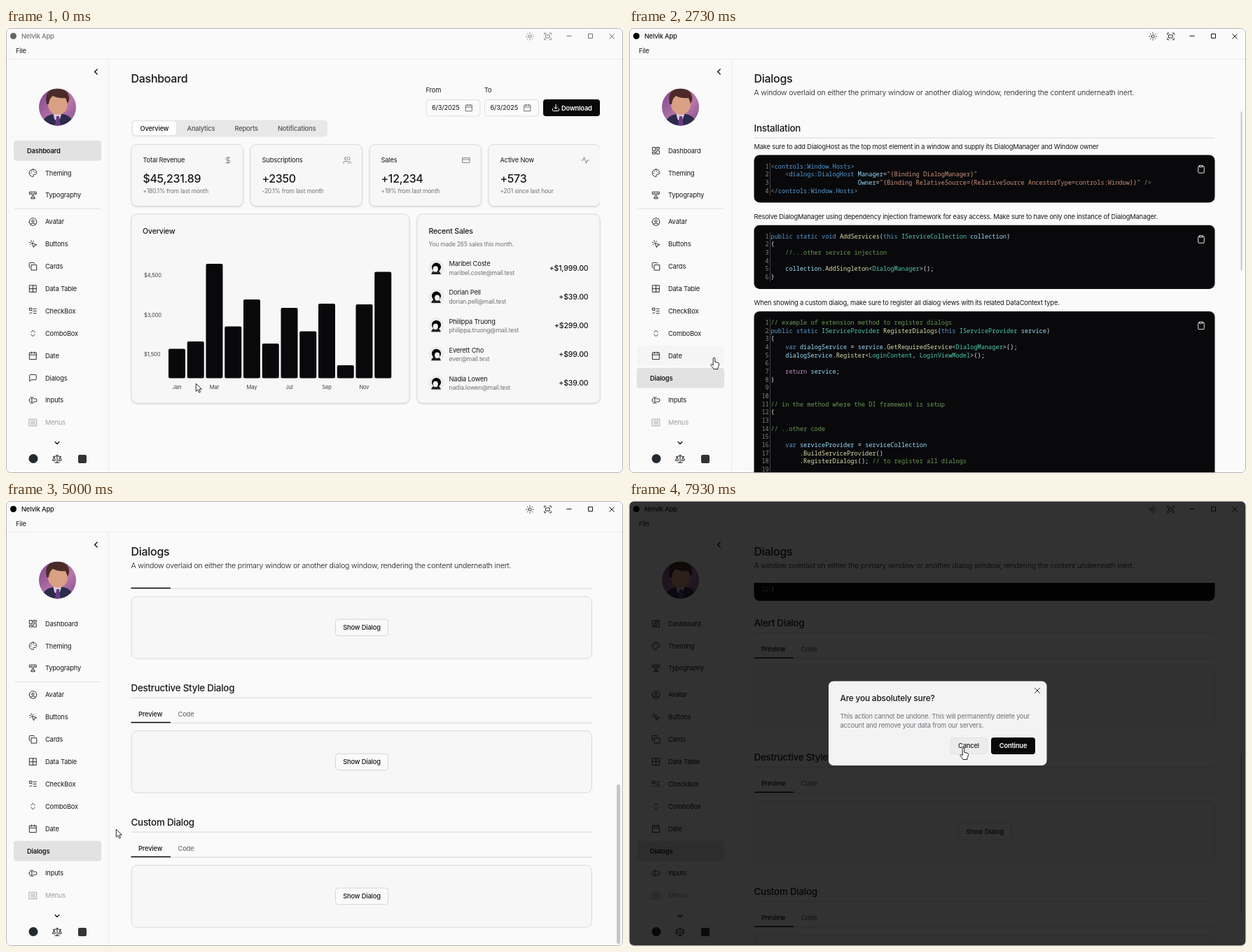
An HTML page for the animation above (8000 ms loop, 881 by 636 pixels).

```html
<!DOCTYPE html>
<html lang="en">
<head>
<meta charset="utf-8">
<title>Dialogs demo</title>
<style>
  html, body { margin: 0; width: 100%; height: 100%; overflow: hidden; background: #fff; }
  svg { display: block; width: 881px; height: 636px; }
  text { font-family: Inter, sans-serif; letter-spacing: -.018em; white-space: pre; }
  .code { font-family: "Noto Sans Mono", monospace; letter-spacing: 0; }
  .card { fill: #f7f7f7; stroke: #dcdcdc; filter: drop-shadow(0 1px 1px #0002); }
</style>
</head>
<body>
<svg id="stage" viewBox="0 0 881 636"></svg>
<script>
const LOOP = 8000, INK = '#18181b', MUTED = '#71717a', BLACK = '#09090b';
const NOTCH = 33.18, CLICK = 1270, PAGE_READY = 1670, MODAL_OPEN = 7000;

// ---- drawing helpers ----
const esc = s => s.replace(/&/g, '&amp;').replace(/</g, '&lt;').replace(/>/g, '&gt;');
const text = (x, y, s, { size = 9.3, fill = INK, weight = 400, anchor = 'start' } = {}) =>
  `<text x="${x}" y="${y + size * .36}" font-size="${size}" fill="${fill}" font-weight="${weight}" text-anchor="${anchor}">${esc(s)}</text>`;
const rect = (x, y, w, h, r, attrs) =>
  `<rect x="${x}" y="${y}" width="${w}" height="${h}" rx="${r}" ${attrs}/>`;
const line = (d, color, width = 1) =>
  `<path d="${d}" fill="none" stroke="${color}" stroke-width="${width}"/>`;
const circle = (x, y, r, fill) => `<circle cx="${x}" cy="${y}" r="${r}" fill="${fill}"/>`;
const range = (n, f) => Array.from({ length: n }, (_, i) => f(i)).join('');

// Icons live on a 24-unit grid.
const box = (x, y, w, h) => `M${x} ${y}h${w}v${h}h${-w}z`;
const ring = (x, y, r) => `M${x - r} ${y}a${r} ${r} 0 1 0 ${2 * r} 0a${r} ${r} 0 1 0 ${-2 * r} 0`;
const ICONS = {
  dashboard: box(3, 3, 7, 9) + box(14, 3, 7, 5) + box(14, 12, 7, 9) + box(3, 16, 7, 5),
  palette: 'M12 2a10 10 0 0 0 0 20c2 0 2-2 1-3-1-2 0-3 2-3h2c3 0 5-2 5-5 0-5-5-9-10-9z' +
    ring(13.5, 6.5, .5) + ring(17.5, 10.5, .5) + ring(8.5, 7.5, .5) + ring(6.5, 12.5, .5),
  type: 'M3 3h18v6h-3V7h-4v11h3v3H7v-3h3V7H6v2H3z',
  user: ring(12, 12, 10) + ring(12, 10, 3) + 'M6 20v-1q0-3 3-3h6q3 0 3 3v1',
  click: 'M9 9l5 12 1.8-5.2L21 14zM7.2 2.2 8 5.1M5.1 8l-2.9-.8M14 4.1 12 6M6 12l-1.9 2',
  copy: box(8, 8, 14, 14) + 'M4 16q-2 0-2-2V4q0-2 2-2h10q2 0 2 2',
  table: box(3, 3, 18, 18) + 'M3 12h18M12 3v18',
  checks: box(3, 4, 6, 6) + 'M3 17l2 2 4-4M13 6h8M13 12h8M13 18h8',
  updown: 'M7 15l5 5 5-5M7 9l5-5 5 5',
  calendar: box(3, 4, 18, 18) + 'M16 2v4M8 2v4M3 10h18',
  message: 'M21 15a2 2 0 0 1-2 2H7l-4 4V5a2 2 0 0 1 2-2h14a2 2 0 0 1 2 2z',
  input: 'M5 4h1q3 0 3 3 0-3 3-3h1M13 20h-1q-3 0-3-3 0 3-3 3H5M5 16H4q-2 0-2-2v-4q0-2 2-2h1M13 8h7q2 0 2 2v4q0 2-2 2h-7M9 7v10',
  menu: box(2, 3, 20, 18) + 'M6 8h12M6 12h12M6 16h12',
  sun: ring(12, 12, 4) + 'M12 2v2M12 20v2M4.9 4.9l1.4 1.4M17.7 17.7l1.4 1.4M2 12h2M20 12h2M6.3 17.7l-1.4 1.4M19.1 4.9l-1.4 1.4',
  screen: box(7, 8, 10, 8) + 'M3 7V3h4M17 3h4v4M21 17v4h-4M7 21H3v-4',
  dollar: 'M12 2v20M17 5H9.5a3.5 3.5 0 0 0 0 7h5a3.5 3.5 0 0 1 0 7H6',
  users: ring(9, 7, 4) + 'M16 21v-2q0-4-4-4H6q-4 0-4 4v2M22 21v-2q0-3-3-4M16 3a4 4 0 0 1 0 8',
  card: box(2, 5, 20, 14) + 'M2 10h20',
  activity: 'M22 12h-4l-3 9L9 3l-3 9H2',
  download: 'M21 15v4q0 2-2 2H5q-2 0-2-2v-4M7 10l5 5 5-5M12 15V3',
  scales: 'M16 16l3-8 3 8q-3 2-6 0zM2 16l3-8 3 8q-3 2-6 0zM7 21h10M12 3v18M3 7h2c2 0 5-1 7-2 2 1 5 2 7 2h2',
  clipboard: box(8, 2, 8, 4) + 'M16 4h2q2 0 2 2v14q0 2-2 2H6q-2 0-2-2V6q0-2 2-2h2',
  left: 'M15 18l-6-6 6-6', down: 'M6 9l6 6 6-6', close: 'M5 5l14 14M19 5 5 19',
};
const icon = (name, x, y, color = INK, scale = .53, width = 1.7) =>
  `<path d="${ICONS[name]}" transform="translate(${x} ${y}) scale(${scale}) translate(-12 -12)" fill="none" stroke="${color}" stroke-width="${width}" stroke-linecap="round" stroke-linejoin="round"/>`;

// ---- window frame and sidebar ----
const NAV = [['Dashboard', 'dashboard'], ['Theming', 'palette'], ['Typography', 'type'],
  ['Avatar', 'user'], ['Buttons', 'click'], ['Cards', 'copy'], ['Data Table', 'table'],
  ['CheckBox', 'checks'], ['ComboBox', 'updown'], ['Date', 'calendar'], ['Dialogs', 'message'],
  ['Inputs', 'input'], ['Menus', 'menu']];
const navY = i => i < 3 ? 175.3 + 31.9 * i : 277 + 31.88 * (i - 3);

const titleBar = `<g id="titleBar">${circle(10.5, 11.5, 4.5, '#000')}
  ${text(22, 11.5, 'Nelvik App', { weight: 500 })}
  ${icon('sun', 748, 12)}${icon('screen', 773.5, 12)}
  ${line('M800.5 11.5h7M831.5 8.5h6v6h-6zM861.5 8.5l7 7M868.5 8.5l-7 7', INK)}</g>`;

const portrait = `<clipPath id="round">${circle(73.5, 113, 26.5)}</clipPath>
  <linearGradient id="purple" x2="1" y2="1"><stop stop-color="#7d4391"/><stop offset=".6" stop-color="#b878a8"/><stop offset="1" stop-color="#7c4a90"/></linearGradient>
  <g clip-path="url(#round)">${circle(73.5, 113, 27, 'url(#purple)')}
  <path d="M50 142q2-17 18-19h13q14 2 17 19z" fill="#2c2b4c"/>
  <path d="M67 120h13l-3 10-4 4-4-4z" fill="#d8cadd"/><path d="M72 126h4l2 15h-8z" fill="#6a3a86"/>
  <ellipse cx="74" cy="109" rx="14" ry="15" fill="#d9a083"/>
  <path d="M58 109q-4-20 12-22 17-2 20 11 1 5-2 10l-3-8q-10 1-18-3-5 3-6 12z" fill="#4a2b28"/></g>`;

const sidebar = `${line('M1 44.5h879M146.5 45v590', '#ebebeb')}${text(14, 32.5, 'File')}
  ${icon('left', 128.5, 62.5, '#000', .6, 2.2)}${portrait}
  ${NAV.map(([label, glyph], i) => `<g ${i === 12 ? 'opacity=".4"' : ''}>
    ${rect(11, navY(i) - 14.5, 125, 29, 4, `id="navBg${i}"`)}
    <g id="navIcon${i}">${icon(glyph, 38.5, navY(i))}</g><g id="navText${i}">${text(56, navY(i), label)}</g></g>`).join('')}
  ${line('M12 258.5h123', '#e2e2e2')}${icon('down', 73, 593, '#000', .5, 2.2)}
  ${circle(39, 615.5, 6.5, '#24292f')}${icon('scales', 73, 615.5, INK, .62, 1.6)}
  ${rect(103, 610, 12, 12, 2, 'fill="#333"')}`;

// ---- dashboard page ----
const STATS = [['Total Revenue', '$45,231.89', '+180.1% from last month', 'dollar'],
  ['Subscriptions', '+2350', '-20.1% from last month', 'users'],
  ['Sales', '+12,234', '+19% from last month', 'card'],
  ['Active Now', '+573', '+201 since last hour', 'activity']];
const BAR_TOPS = [458.5, 448, 337, 426.5, 388, 451, 400, 433.5, 394, 482, 395, 348.5];
const SALES = [['Maribel Coste', 'maribel.coste', '+$1,999.00'], ['Dorian Pell', 'dorian.pell', '+$39.00'],
  ['Philippa Truong', 'philippa.truong', '+$299.00'], ['Everett Cho', 'ever', '+$99.00'],
  ['Nadia Lowen', 'nadia.lowen', '+$39.00']];
const small = { size: 8.4, fill: MUTED }, title = { size: 10.6, weight: 500 };

const dateField = (x, label) => text(x, 89, label) +
  rect(x + .5, 102.5, 77, 23.5, 4, 'fill="#fafafa" stroke="#dedede"') +
  text(x + 8.5, 114, '6/3/2025') + icon('calendar', x + 61.5, 114, '#52525b', .48);

const statCard = ([label, value, note, glyph], i) => {
  const x = 179 + 170 * i;
  return rect(x, 166.5, 159.5, 88, 8, 'class="card"') + text(x + 16.5, 189, label) +
    icon(glyph, x + 138, 189, MUTED, .5) +
    text(x + 16.5, 215, value, { size: 15.9, weight: 500 }) + text(x + 16.5, 233, note, small);
};
const saleRow = ([name, user, amount], i) => {
  const y = 343 + 41.1 * i, tilt = i % 2 ? 1.2 : -1.2;
  return circle(614.5, y, 11, '#ececec') +
    `<path d="M607 ${y + 9}q2-6 7-6t7 6z" fill="#222"/>` + circle(614.5, y - 1, 6.5, '#000') +
    `<ellipse cx="${614.5 + tilt}" cy="${y + 1.5}" rx="3.6" ry="4.2" fill="#f4f4f4"/>` +
    text(632.5, y - 6, name) + text(632.5, y + 6.7, user + '@mail.test', { size: 8.6, fill: MUTED }) +
    text(831.5, y, amount, { size: 10.6, weight: 500, anchor: 'end' });
};
const axis = { size: 7.6, fill: '#3f3f46' };

const dashboard = `<g id="dashboard">${text(178.5, 72.5, 'Dashboard', { size: 16, weight: 500 })}
  ${dateField(599.5, 'From')}${dateField(683, 'To')}
  ${rect(767, 102, 81, 24, 4, `fill="${BLACK}"`)}${icon('download', 785, 114, '#fff', .5, 2)}
  ${text(793, 114.3, 'Download', { fill: '#fff', weight: 600 })}
  ${rect(179, 131.5, 280, 24, 5, 'fill="#e8e8e8"')}${rect(181, 133.5, 62, 19.5, 4, 'fill="#fff"')}
  ${text(191.5, 143.5, 'Overview', { weight: 500 })}
  ${[[258.5, 'Analytics'], [326.5, 'Reports'], [388, 'Notifications']].map(([x, s]) => text(x, 143.5, s, { fill: '#52525b', weight: 500 })).join('')}
  <clipPath id="cardClip">${rect(170, 160, 678, 105, 0, '')}</clipPath>
  <g clip-path="url(#cardClip)">${STATS.map(statCard).join('')}</g>
  ${rect(179, 266, 397, 270, 8, 'class="card"')}${text(195, 290, 'Overview', title)}
  ${['$4,500', '$3,000', '$1,500'].map((s, i) => text(197, 353.5 + 56.5 * i, s, axis)).join('')}
  ${BAR_TOPS.map((y, i) => rect(232 + 26.75 * i, y, 24, 500.5 - y, 2, `fill="${BLACK}"`)).join('')}
  ${['Jan', 'Mar', 'May', 'Jul', 'Sep', 'Nov'].map((s, i) => text(244 + 53.5 * i, 513.5, s, { ...axis, anchor: 'middle' })).join('')}
  ${rect(587, 266, 261, 270, 8, 'class="card"')}${text(603.5, 290, 'Recent Sales', title)}
  ${text(603.5, 308.5, 'You made 265 sales this month.', small)}${SALES.map(saleRow).join('')}</g>
  <g id="loader"><g id="spinner">${line('M520.7 337.4a10 10 0 1 1 0-12.8', '#71717a', 2)}</g>
  ${text(513, 353.5, 'Loading...', { fill: MUTED, anchor: 'middle' })}</g>`;

// ---- dialogs page ----
const XML = { re: /("[^"]*")|([\w:.]+)(?==)|([<>\/]+)|([\w:.]+)|(\s+|.)/g,
  colors: ['#ce9178', '#9cdcfe', '#8a8a8a', '#569cd6', '#d4d4d4'] };
const CSHARP = { re: /(\/\/.*)|\b(public|static|void|this|var)\b|\b(return)\b|([A-Z]\w*)(?=[(<])|([A-Z]\w*)|([a-z]\w*)|(\s+|.)/g,
  colors: ['#6a9955', '#569cd6', '#c586c0', '#dcdcaa', '#4ec9b0', '#9cdcfe', '#e4e4e4'] };
const HOST_CODE = `<controls:Window.Hosts>
    <dialogs:DialogHost Manager="{Binding DialogManager}"
                        Owner="{Binding RelativeSource={RelativeSource AncestorType=controls:Window}}" />
</controls:Window.Hosts>`;
const INJECT_CODE = `public static void AddServices(this IServiceCollection collection)
{
    //...other service injection

    collection.AddSingleton<DialogManager>();
}`;
const REGISTER_CODE = `// example of extension method to register dialogs
public static IServiceProvider RegisterDialogs(this IServiceProvider service)
{
    var dialogService = service.GetRequiredService<DialogManager>();
    dialogService.Register<LoginContent, LoginViewModel>();

    return service;
}


// in the method where the DI framework is setup
{

// ..other code

    var serviceProvider = serviceCollection
        .BuildServiceProvider()
        .RegisterDialogs(); // to register all dialogs

// ..the rest of the code

}`;
const highlight = (s, { re, colors }) => [...s.matchAll(re)].map(m =>
  `<tspan fill="${colors[m.slice(1).findIndex(Boolean)]}">${esc(m[0])}</tspan>`).join('');
const codeBlock = (y, source, syntax) => {
  const lines = source.split('\n'), pitch = 11.65, height = lines.length * pitch + 21.3;
  return rect(178.5, y, 658, height, 8, `fill="${BLACK}"`) + icon('clipboard', 817, y + 20.3, '#fff', .53) +
    line(`M201.5 ${y + 10.5}v${height - 21}`, '#5a5a5a', .7) +
    lines.map((s, i) => {
      const base = y + 19.1 + i * pitch;
      return `<text class="code" font-size="8.63" x="199.8" y="${base}" text-anchor="end" fill="#858585">${i + 1}</text>` +
        `<text class="code" font-size="8.63" x="202.5" y="${base}">${highlight(s, syntax)}</text>`;
    }).join('');
};
const heading = (y, s) => text(178.5, y, s, { size: 13.4, weight: 500 }) + line(`M178.5 ${y + 14}h658`, '#d6d6d6');
const example = (name, i) => {
  const y = 714.5 + 192 * i;
  return heading(y, name) + text(189, y + 37.2, 'Preview', { weight: 500 }) + text(245.5, y + 37.2, 'Code', { fill: MUTED, weight: 500 }) +
    line(`M178.5 ${y + 50}h658`, '#d6d6d6') + line(`M178.5 ${y + 49.5}h56.5`, BLACK, 1.5) +
    rect(179, y + 61.5, 657.5, 88.5, 8, 'fill="#f7f7f7" stroke="#dadada"') +
    rect(470.5, y + 94, 75, 23.5, 4, 'fill="#fafafa" stroke="#d6d6d6"') +
    text(508, y + 105.8, 'Show Dialog', { weight: 500, anchor: 'middle' });
};
const dialogs = `<g id="dialogs">${text(178.5, 72.5, 'Dialogs', { size: 16, weight: 500 })}
  ${text(178.5, 92, 'A window overlaid on either the primary window or another dialog window, rendering the content underneath inert.', { size: 10.6, weight: 300 })}
  <clipPath id="viewport">${rect(170, 117, 680, 518.5, 0, '')}</clipPath>
  <g clip-path="url(#viewport)"><g id="content">${heading(143, 'Installation')}
  ${text(178.5, 169.5, 'Make sure to add DialogHost as the top most element in a window and supply its DialogManager and Window owner')}
  ${codeBlock(181.5, HOST_CODE, XML)}
  ${text(178.5, 269.5, 'Resolve DialogManager using dependency injection framework for easy access. Make sure to have only one instance of DialogManager.')}
  ${codeBlock(281.7, INJECT_CODE, CSHARP)}
  ${text(178.5, 393, 'When showing a custom dialog, make sure to register all dialog views with its related DataContext type.')}
  ${codeBlock(405, REGISTER_CODE, CSHARP)}
  ${['Alert Dialog', 'Destructive Style Dialog', 'Custom Dialog'].map(example).join('')}</g></g>
  ${rect(872, 119, 5, 228, 2.5, 'id="thumb" fill="#c6c6c6"')}</g>`;

const modal = `${rect(1, 1, 879, 634, 5, 'id="shade"')}
  <g id="modal">${rect(285, 257.5, 311.5, 120.5, 7, 'fill="#f3f3f3"')}${icon('close', 583, 271, INK, .5, 1.8)}
  ${text(301.5, 282, 'Are you absolutely sure?', { size: 11.9, weight: 500 })}
  ${text(301.5, 308, 'This action cannot be undone. This will permanently delete your', { fill: MUTED })}
  ${text(301.5, 321, 'account and remove your data from our servers.', { fill: MUTED })}
  ${rect(459, 338.5, 52.5, 23, 4, 'fill="#ececec" stroke="#e2e2e2"')}${text(485, 350, 'Cancel', { weight: 500, anchor: 'middle' })}
  ${rect(517, 338, 63, 24, 4, `fill="${BLACK}"`)}${text(548.5, 350, 'Continue', { fill: '#fff', weight: 600, anchor: 'middle' })}</g>`;

const cursor = `<g id="cursor" fill="#fff" stroke="#111" stroke-width=".9" stroke-linejoin="round">
  <path id="arrow" d="M.3.3V11.3l2.6-2.4 1.9 4.1 1.8-.8L4.8 8.2h3.6z"/>
  <path id="hand" d="M-1.3 1.3a1.3 1.3 0 0 1 2.6 0v5l4 .9q1.9.5 1.7 2.3l-.6 3.2-1.1 2.3v1.5h-5.8l-1-1.7-2.8-3.4q-.9-1.3.2-1.8 1-.4 2.8 1.3z"/></g>`;

const stage = document.getElementById('stage');
stage.innerHTML = rect(.5, .5, 880, 635, 6, 'fill="#fafafa"') + titleBar + sidebar + dashboard + dialogs + modal +
  rect(.5, .5, 880, 635, 6, 'fill="none" stroke="#b4b4b4"') + cursor;
const el = {};
stage.querySelectorAll('[id]').forEach(node => el[node.id] = node);
const set = (id, attrs) => { for (const k in attrs) el[id].setAttribute(k, attrs[k]); };
const show = (id, opacity) => set(id, { opacity, visibility: opacity > 0 ? 'visible' : 'hidden' });

// ---- motion ----
const clamp = v => Math.min(1, Math.max(0, v));
const easeOut = v => 1 - (1 - clamp(v)) ** 2;

// Pointer moves: start, end, control point, destination.
const MOVES = [[70, 870, 190, 545, 84.5, 502], [2500, 2730, 100, 485, 121.5, 471],
  [2790, 3180, 140, 466, 158, 467], [4950, 5000, 158, 468, 157, 469],
  [5270, 5800, 200, 548, 380, 372], [6330, 6800, 456, 254, 508, 282], [7480, 7930, 469, 300, 477.5, 353]];
// Wheel position in notches from each moment on.
const WHEEL = [[0, 0], [3130, 1], [3200, 4], [3470, 6], [3530, 8], [3870, 10], [4200, 12], [4270, 14],
  [4330, 16], [4600, 18], [4670, 19.27], [6000, 18.27], [6070, 16.27]];

function pointerAt(t) {
  let x = 271, y = 508;
  for (const [start, end, cx, cy, ex, ey] of MOVES) {
    if (t < start) break;
    const u = easeOut((t - start) / (end - start)), v = 1 - u;
    x = v * v * x + 2 * u * v * cx + u * u * ex;
    y = v * v * y + 2 * u * v * cy + u * u * ey;
  }
  return [x, y];
}

function render(t) {
  const [x, y] = pointerAt(t);
  const busy = t >= 1130 && t < PAGE_READY, modalOpen = t >= MODAL_OPEN;
  const inside = (l, top, r, b) => x > l && x < r && y > top && y < b;

  // The interface stalls briefly while the new page is built.
  const uiTime = t > 1530 && t < PAGE_READY ? 1530 : t;
  const p = clamp((uiTime - CLICK) / 300);
  const selected = t < CLICK ? 0 : 10;
  let overItem = false;
  NAV.forEach((_, i) => {
    const isSelected = i === selected;
    const shift = i === 0 ? 1 - p : i === 10 ? p : 0;
    const hover = !modalOpen && inside(11, navY(i) - 14.5, 136, navY(i) + 14.5);
    overItem ||= hover;
    set('navBg' + i, { fill: isSelected ? '#e2e2e2' : hover ? '#f5f5f5' : 'none' });
    set('navIcon' + i, { transform: `translate(${-26 * shift})`, opacity: clamp(isSelected ? 1 - 1.75 * shift : 2.3 * (1 - shift)) });
    set('navText' + i, { transform: `translate(${-26 * shift})` });
    el['navText' + i].firstChild.setAttribute('font-weight', isSelected ? 600 : 400);
  });

  set('titleBar', { opacity: t < CLICK ? .6 : 1 });
  const loaded = t >= PAGE_READY;
  show('dashboard', loaded ? 0 : 1 - p * p);
  show('loader', loaded ? 0 : p * .8);
  set('spinner', { transform: `rotate(${(uiTime - 1400) * .36} 513 331)` });
  show('dialogs', loaded ? easeOut((t - PAGE_READY + 60) / 400) : 0);

  const scroll = WHEEL.findLast(([start]) => t >= start)[1] * NOTCH;
  const wide = x > 147 && !modalOpen;
  set('content', { transform: `translate(0 ${-scroll})` });
  set('thumb', { x: wide ? 872 : 873.5, width: wide ? 5 : 2, y: 119 + scroll / 2.236 });

  const a = easeOut((t - MODAL_OPEN) / 270);
  show('shade', .8 * a);
  show('modal', a);
  set('modal', { transform: `translate(440.7 317.7) scale(${.95 + .05 * a}) translate(-440.7 -317.7)` });

  const hand = modalOpen ? inside(459, 338, 512, 362)
    : overItem && !busy || t > 6330 && inside(470, 268, 546, 292);
  set('cursor', { transform: `translate(${x} ${y})` });
  show('hand', hand ? 1 : 0);
  show('arrow', hand ? 0 : 1);
}

const startTime = performance.now();
(function tick() {
  render((performance.now() - startTime) % LOOP);
  requestAnimationFrame(tick);
})();
</script>
</body>
</html>
```
